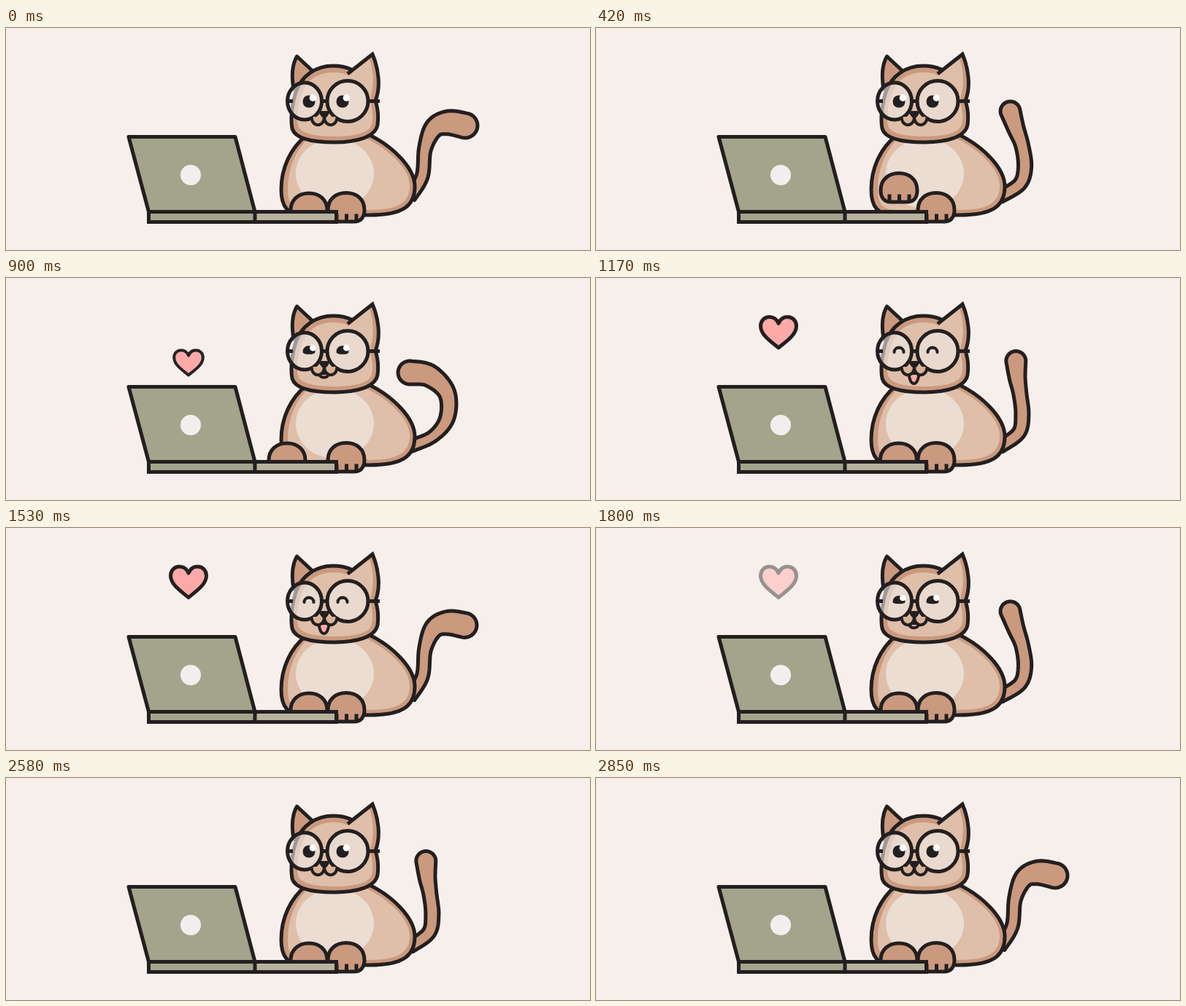
Recreate the animation shown at these times as an HTML page. Size 800 by 305 pixels, loop 3600 ms.

```html
<!DOCTYPE html>
<html lang="en">
<head>
<meta charset="utf-8">
<title>Cat at a laptop</title>
<style>
  html, body { margin: 0; width: 100%; height: 100%; overflow: hidden; background: #f7efeb; }
  svg { display: block; width: 100vw; height: 100vh; }
  .line { stroke: #231f20; stroke-width: 5; stroke-linejoin: round; }
  .thin { stroke: #231f20; stroke-width: 4; stroke-linejoin: round; }
  .fur { fill: #cb997e; }
  .light { fill: #dfbfa9; }
  .ink { fill: #231f20; }
  .none { fill: none; }
</style>
</head>
<body>
<svg viewBox="0 0 800 305">
  <defs>
    <g id="paw">
      <path class="fur line" d="M390 223C390 208 401 199.500 415 199.500S440 208 440 223C440 233 435 239 426 239H404C395 239 390 233 390 223Z"/>
      <path class="line none" d="M402 228.500V238M415.500 228.500V238M429 228.500V238"/>
    </g>
  </defs>

  <path id="tail" class="fur line"/>

  <path class="fur" d="M411 148C390 165 377 192 377 222C377 245 385 257 410 257H497C540 257 560 247 560 218C560 192 530 163 498 147Z"/>
  <path class="light" d="M416 150C396 168 386 194 386 222C386 242 393 250 412 250H497C535 250 553 241 553 217C553 194 526 168 494 152Z"/>
  <ellipse cx="450.500" cy="200" rx="53.500" ry="48" fill="#ecddd3"/>
  <path class="line none" d="M411 148C390 165 377 192 377 222C377 245 385 257 410 257H497C540 257 560 247 560 218C560 192 530 163 498 147"/>

  <use id="tap" href="#paw"/>
  <use href="#paw" transform="translate(51 27)"/>

  <g id="heart">
    <path d="M0 21.500C-10 13-24.500 4-24.500-8.500C-24.500-16-19-21-12.500-21C-6-21-2-17 0-12C2-17 6-21 12.500-21C19-21 24.500-16 24.500-8.500C24.500 4 10 13 0 21.500Z" class="line" fill="#ffa9a9"/>
  </g>

  <path class="line" fill="#a3a48b" d="M168 149.500H314L341 252.500H195.500Z"/>
  <circle cx="253" cy="202" r="14" fill="#f1efee"/>
  <path fill="#a3a48b" d="M195.500 252.500H341V266.500H195.500Z"/>
  <path fill="#b7b29e" d="M341 252.500H452.500V266.500H341Z"/>
  <path class="line none" style="stroke-linejoin:miter" d="M195.500 252.500H452.500V266.500H195.500ZM341 252.500V266.500"/>

  <path class="fur line" d="M394 84C391 66 392 50 398.500 39L421 60L404 84Z"/>
  <path class="fur" d="M468 63L502 36C510 55 514 80 506 100C511 115 510 125 509 133C506 150 480 157 450 157C420 157 396 152 392 138C389 122 393 100 397 88C405 65 425 52 448 52C458 52 466 53.500 473 57Z"/>
  <path class="light" d="M468 65L498 43C504 60 505 80 498 100C503 114 503 124 501 132C498 145 476 149 450 149C424 149 403 145 400 134C397 122 401 103 405 91C412 71 428 61 448 61C457 61 463 62 468 65Z"/>
  <path class="line none" style="stroke-linejoin:miter" d="M468 63L502 36C510 55 514 80 506 100C511 115 510 125 509 133C506 150 480 157 450 157C420 157 396 152 392 138C389 122 393 100 397 88C405 65 425 52 448 52C458 52 466 53.500 473 57"/>

  <g class="line" fill="#f0ece8" fill-opacity=".6">
    <ellipse cx="409" cy="100.500" rx="23.500" ry="25.500"/>
    <circle cx="468" cy="100.500" r="28"/>
    <path d="M432 100.500H440M386 100.500H393M496 100.500H512"/>
  </g>

  <g id="eyes"></g>

  <path id="mouth" class="thin" fill="#ffa9a9"/>
  <g class="thin" fill="#d9b295">
    <path d="M418.500 122C418.500 137 436 137 436 122"/>
    <path d="M436 122C436 137 453.500 137 453.500 122"/>
  </g>
  <path class="ink" d="M429 116Q429 114 432 114H440Q443 114 443 116Q442 121 436 124.500Q430 121 429 116Z"/>
</svg>
<script>
const LOOP = 3600;
const $ = id => document.getElementById(id);

// Tail spine: x, y, radius from root to tip
const RIGHT = [[553,232,8], [570,204,8], [574,166,8.5], [586,138,12.5], [606,130,16], [629,134,17]];
const UP = [[553,232,8], [579,213,8.5], [584,188,9], [581,160,9], [577,137,11], [575,114,13.5]];
const LEFT = [[553,231,8], [584,218,7.5], [604,193,9.5], [604,158,11], [580,134,14.5], [553,130,16]];

// Start, end, from, to
const TAIL = [[120,660,0,1], [900,1440,1,0], [1500,2040,0,1], [2310,2850,1,0]];
const SMILE = [[660,1200,0,1], [1500,2070,1,0]];
const RISE = [[660,1200,0,1]];
const GLOW = [[660,930,0,1], [1500,2070,1,0]];
const PAW_X = [[420,720,0,-30], [900,1200,-30,0]];
const PAW_Y = [[120,420,27.5,0], [420,720,0,27.5]];

const ease = p => p < .5 ? 2 * p * p : 1 - 2 * (1 - p) ** 2;

function track(steps, t) {
  let v = steps[0][2];
  for (const [a, b, from, to] of steps) {
    if (t < a) break;
    v = from + (to - from) * ease(Math.min(1, (t - a) / (b - a)));
  }
  return v;
}

function spline(a, b, c, d, u) {
  return b.map((v, i) => v + .5 * u * (c[i] - a[i] +
    u * (2 * a[i] - 5 * v + 4 * c[i] - d[i] + u * (3 * (v - c[i]) + d[i] - a[i]))));
}

function tailPath(p) {
  const wr = (1 - p) * (1 - 2 * p), wu = 4 * p * (1 - p), wl = p * (2 * p - 1);
  const keys = RIGHT.map((k, i) => k.map((v, j) => wr * v + wu * UP[i][j] + wl * LEFT[i][j]));
  const at = i => keys[Math.max(0, Math.min(keys.length - 1, i))];
  const spine = [];
  for (let i = 0; i < keys.length - 1; i++)
    for (let s = 0; s < 8; s++) spine.push(spline(at(i - 1), at(i), at(i + 1), at(i + 2), s / 8));
  spine.push(at(9));

  const one = [], two = [];
  let angle = 0;
  spine.forEach(([x, y, r], i) => {
    const a = spine[Math.max(0, i - 1)], b = spine[Math.min(spine.length - 1, i + 1)];
    angle = Math.atan2(b[1] - a[1], b[0] - a[0]);
    const dx = Math.sin(angle) * r, dy = -Math.cos(angle) * r;
    one.push([x + dx, y + dy]);
    two.unshift([x - dx, y - dy]);
  });
  const [x, y, r] = at(9), cap = [];
  for (let i = 1; i < 16; i++) {
    const q = angle - Math.PI / 2 + Math.PI * i / 16;
    cap.push([x + r * Math.cos(q), y + r * Math.sin(q)]);
  }
  return 'M' + [...one, ...cap, ...two].map(q => q[0].toFixed(2) + ' ' + q[1].toFixed(2)).join('L') + 'Z';
}

const eyes = [415, 461].map(x => {
  const make = (tag, cls) => {
    const el = document.createElementNS('http://www.w3.org/2000/svg', tag);
    el.setAttribute('class', cls);
    return $('eyes').appendChild(el);
  };
  const pupil = make('path', 'ink thin'), shine = make('circle', '');
  pupil.setAttribute('stroke-linecap', 'round');
  shine.setAttribute('cx', x + 5.3);
  shine.setAttribute('cy', 96);
  shine.setAttribute('fill', '#fff');
  return { x, pupil, shine };
});

function draw(t) {
  $('tail').setAttribute('d', tailPath(track(TAIL, t)));
  $('tap').setAttribute('transform', `translate(${track(PAW_X, t)} ${track(PAW_Y, t)})`);

  const k = track(SMILE, t);
  for (const { x, pupil, shine } of eyes) {
    const l = x - 6.5, r = x + 6.5, y = 101 + k, top = 92.3 + 1.2 * k, low = 109.7 - 16.2 * k;
    pupil.setAttribute('d', `M${l} ${y}C${l} ${top} ${r} ${top} ${r} ${y}C${r} ${low} ${l} ${low} ${l} ${y}Z`);
    shine.setAttribute('r', 4.7 * Math.max(0, 1 - k ** 3));
  }
  const drop = 131 + 14 * k, bend = 131 + 9 * k;
  $('mouth').setAttribute('d', `M428.500 131C429 ${bend} 432 ${drop} 435.500 ${drop}C439 ${drop} 442 ${bend} 442.500 131Z`);
  $('mouth').style.display = k > .02 ? '' : 'none';

  const rise = track(RISE, t);
  $('heart').setAttribute('transform', `translate(250 ${144 - 70 * rise}) scale(${.68 + .32 * rise})`);
  $('heart').setAttribute('opacity', track(GLOW, t));
}

function tick() {
  draw(performance.now() % LOOP);
  requestAnimationFrame(tick);
}
tick();
</script>
</body>
</html>
```
